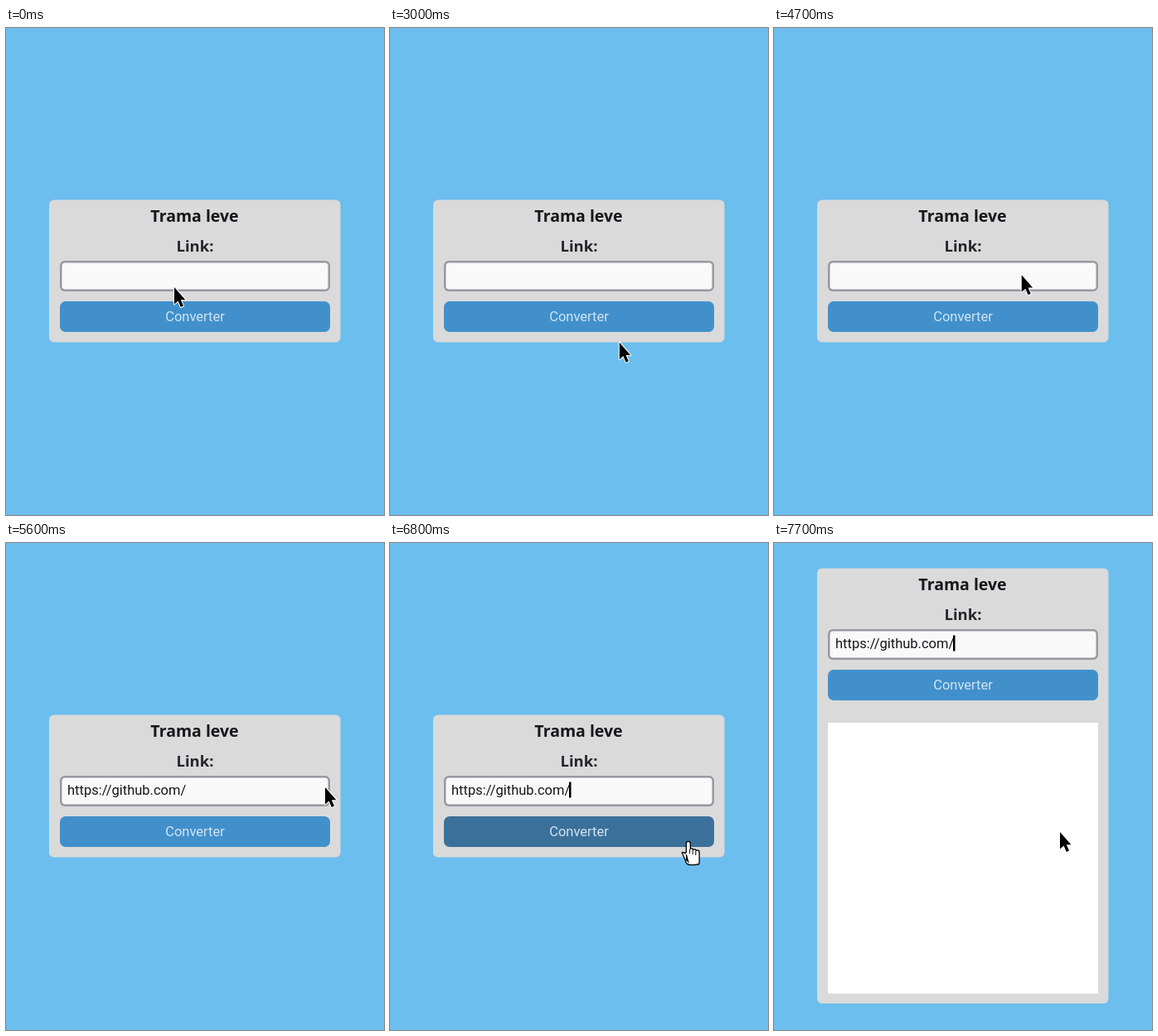
An HTML page with a canvas for the animation above (8 s loop, 456 by 588 pixels).

```html
<!DOCTYPE html>
<html lang="pt">
<head>
<meta charset="utf-8">
<title>Trama leve</title>
<style>
html, body { margin: 0; width: 456px; height: 588px; overflow: hidden; background: #6cbeee; }
canvas { display: block; }
</style>
</head>
<body>
<canvas id="stage" width="456" height="588"></canvas>
<script>
const ctx = document.getElementById('stage').getContext('2d');
const LOOP = 8000, STEP = 100;
const FOCUS = 3800, PASTE = 5300, HOVER = 5900, CONVERT = 7100;
const SKY = '#6cbeee', CARD = '#dadada', INK = '#17171b';

// Card layout, relative to the top of the card
const CENTER = 228, LEFT = 65, WIDTH = 326, ROW = 37;
const FIELD_Y = 73.5, BUTTON_Y = 122.5;

// Each pointer move bends towards "via", starting where the last one ended
const home = { x: 203, y: 313 };
const moves = [
  { start: 200, end: 700, via: { x: 329, y: 139 }, to: home },
  { start: 900, end: 1400, via: { x: 420, y: 690 }, to: { x: 380, y: 468 } },
  { start: 2800, end: 3700, via: { x: -70, y: 80 }, to: { x: 131, y: 297 } },
  { start: 3700, end: 4000, via: { x: 140, y: 300 }, to: { x: 149, y: 303 } },
  { start: 4400, end: 4900, via: { x: 260, y: 300 }, to: { x: 385, y: 295 } },
  { start: 5800, end: 6200, via: { x: 380, y: 330 }, to: { x: 358, y: 361 } },
  { start: 7000, end: CONVERT, via: { x: 352, y: 355 }, to: { x: 345, y: 349 } }
];

function ease(t, start, end) {
  const k = Math.max(0, Math.min(1, (t - start) / (end - start)));
  return k * k * (3 - 2 * k);
}

function bend(a, b, c, k) {
  return (1 - k) ** 2 * a + 2 * k * (1 - k) * b + k * k * c;
}

function pointerAt(t) {
  let at = home;
  for (const { start, end, via, to } of moves) {
    if (t < start) break;
    const k = ease(t, start, end);
    at = { x: bend(at.x, via.x, to.x, k), y: bend(at.y, via.y, to.y, k) };
  }
  return at;
}

function box(x, y, w, h, r, fill) {
  ctx.beginPath();
  ctx.roundRect(x, y, w, h, r);
  ctx.fillStyle = fill;
  ctx.fill();
}

function label(text, x, y, font, color, align = 'center') {
  ctx.font = font;
  ctx.textAlign = align;
  ctx.fillStyle = color;
  ctx.fillText(text, x, y);
}

function buttonColor(t) {
  const hover = ease(t, HOVER, HOVER + 300) - ease(t, CONVERT, CONVERT + 400);
  const mix = (a, b) => Math.round(a + (b - a) * hover);
  return `rgb(${mix(65, 59)},${mix(144, 112)},${mix(204, 155)})`;
}

function drawCaret(t) {
  const lit = t >= FOCUS && (t - 500) % 900 < 600;
  if (lit) box(t < PASTE ? 74 : 216, 81, 2.5, 19, 0, '#000');
}

function drawForm(t) {
  label('Trama leve', CENTER - 0.5, 26, '900 19.5px "Noto Sans", sans-serif', INK);
  label('Link:', CENTER, 62, '600 18.5px "Noto Sans", sans-serif', '#25252a');
  box(LEFT, FIELD_Y, WIDTH, ROW, 6, '#9898a2');
  box(LEFT + 2.5, FIELD_Y + 2.5, WIDTH - 5, ROW - 5, 4, '#f9f9fa');
  if (t >= PASTE) label('https://github.com/', 74, 96, '16.5px Roboto, sans-serif', INK, 'left');
  drawCaret(t);
  box(LEFT, BUTTON_Y, WIDTH, ROW, 7, buttonColor(t));
  label('Converter', CENTER, 146, '16.5px Roboto, sans-serif', '#d3e3f0');
}

// Areas of the moved card that have not been painted yet
function drawGaps() {
  const gap = (y, w) => box(CENTER - w / 2, y, w, ROW, 0, SKY);
  gap(0, 106);
  gap(36.5, 42);
  gap(FIELD_Y, WIDTH);
  gap(BUTTON_Y, WIDTH);
}

function drawArrow() {
  const shape = new Path2D('M0 0V20.5L4.6 16.4L7.8 24L11 22.6L7.8 15.2H13.4Z');
  ctx.strokeStyle = '#fff';
  ctx.lineWidth = 2;
  ctx.stroke(shape);
  ctx.fillStyle = '#000';
  ctx.fill(shape);
}

function drawHand() {
  const shape = new Path2D();
  shape.roundRect(-1, 12, 15.5, 15, [2, 2, 5, 5]);
  for (let i = 0; i < 4; i++) shape.roundRect(i * 3.6, i ? 7.5 + i : 0, 3.7, 16, 1.8);
  shape.moveTo(0, 15);
  shape.lineTo(-5, 13);
  shape.lineTo(-1, 22);
  shape.lineTo(3, 26);
  shape.closePath();
  ctx.strokeStyle = '#000';
  ctx.lineWidth = 2.6;
  ctx.stroke(shape);
  ctx.fillStyle = '#fff';
  ctx.fill(shape);
  ctx.fillStyle = '#000';
  for (let i = 1; i < 4; i++) ctx.fillRect(i * 3.6 - 0.5, 8 + i, 1, 5);
}

function drawPointer(t) {
  const { x, y } = pointerAt(t);
  ctx.save();
  ctx.translate(x, y);
  ctx.lineJoin = 'round';
  if (t > HOVER + 100 && t < CONVERT) drawHand();
  else drawArrow();
  ctx.restore();
}

function draw(t) {
  const open = t >= CONVERT;
  box(0, 0, 456, 588, 0, SKY);
  ctx.save();
  ctx.translate(0, open ? 30.5 : 207.5);
  box(52, 0, 351.5, open ? 525.5 : 172, 6, CARD);
  if (open) box(LEFT, 186.5, WIDTH, 327, 0, '#fff');
  if (open && t < CONVERT + STEP) drawGaps();
  else drawForm(t);
  ctx.restore();
  drawPointer(t);
}

const begin = performance.now();
function tick() {
  const t = (performance.now() - begin) % LOOP;
  draw(Math.floor(t / STEP) * STEP);
  requestAnimationFrame(tick);
}
tick();
</script>
</body>
</html>
```
